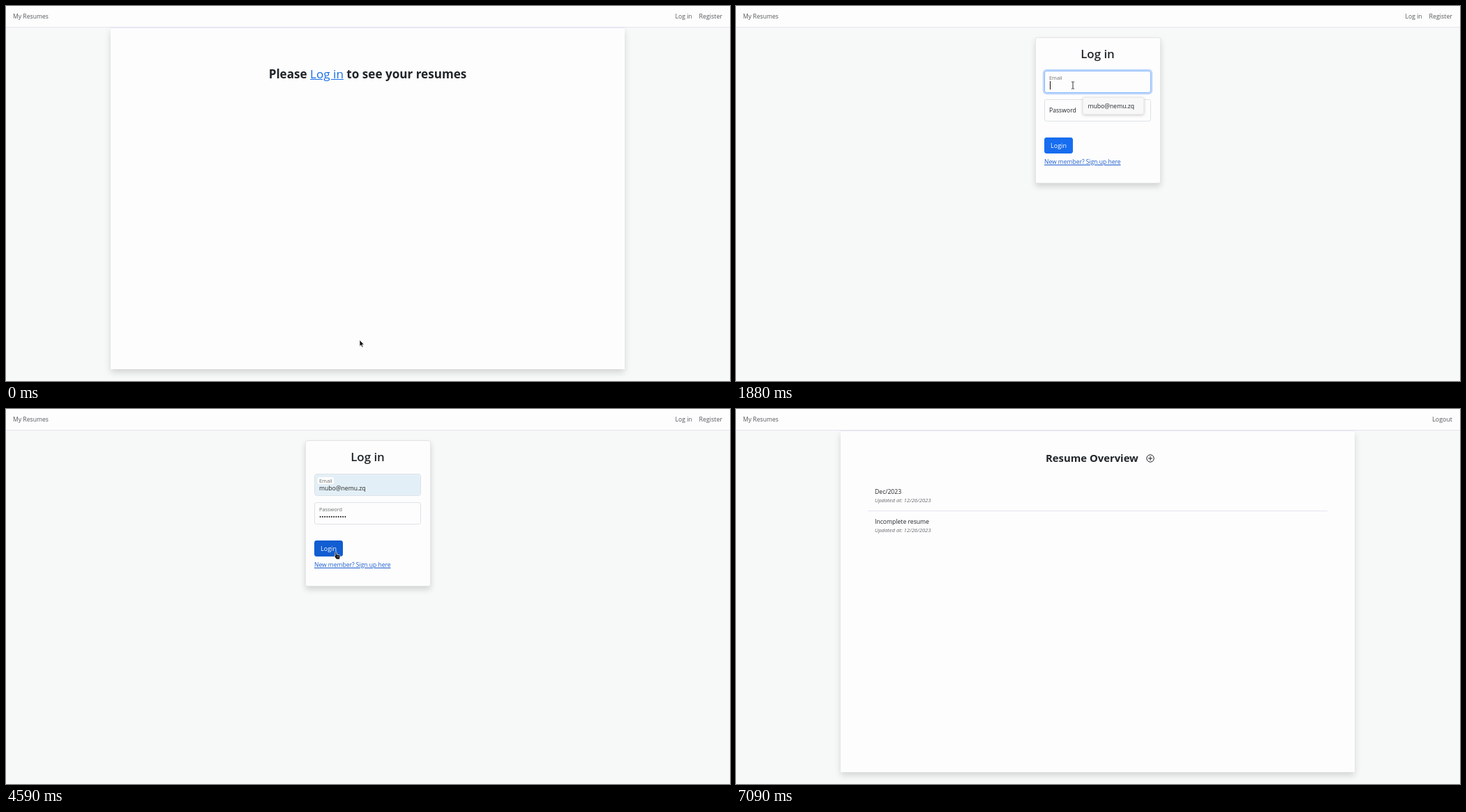
An HTML page that plays this animation: 1038x539 px, repeating every 7990 ms.

```html
<!DOCTYPE html>
<html lang="en">
<head>
<meta charset="utf-8">
<title>My Resumes</title>
<style>
html, body { margin: 0; width: 100%; height: 100%; overflow: hidden; }
body { position: relative; background: #f7f8f8; color: #212529; font: 8.65px/20px "Open Sans", "Noto Sans", sans-serif; }
body *, body *::before, body *::after { position: absolute; box-sizing: border-box; }
b, i, u, label, h1 { white-space: nowrap; margin: 0; font-weight: 400; font-style: normal; text-decoration: none; }
.scene { inset: 0; }
nav { left: 0; top: 0; width: 100%; height: 31px; background: #fdfdfd; border-bottom: 1px solid #e5e5f3; }
nav + b, .nav { color: #55585b; top: 5px; }
h1 { font-weight: 700; }
h1 u { position: static; color: #186ee8; text-decoration: underline; }
.mid { left: 518.5px; transform: translateX(-50%); }
.sheet { left: 150px; top: 31px; width: 737px; height: 491px; background: #fdfdfd; border-top: 1px solid #e9e9f4; box-shadow: 0 4.5px 9px rgba(0,0,0,.15); }
.card { left: 428.5px; top: 44.5px; width: 180px; height: 210px; background: #fdfdfd; border: 1px solid #e4e5e7; border-radius: 3px; box-shadow: 0 4.5px 9px rgba(0,0,0,.15); }
.field { left: 442px; width: 153px; height: 32px; border: 1px solid #dee2e6; border-radius: 3.4px; background: #fdfdfd; }
.ring { inset: -1px; border: 1px solid #86b7fe; border-radius: 3.4px; box-shadow: 0 0 0 2.25px rgba(13,110,253,.25); }
.fill { inset: 0; background: #e3eff6; border-radius: 2.5px; }
label { left: 6px; top: 5px; transform-origin: 0 50%; }
label::before { content: ""; z-index: -1; left: -3px; right: -3px; top: 4px; bottom: 4px; background: #fdfdfd; border-radius: 3px; }
.field label { z-index: 1; }
.value { left: 6px; top: 14px; line-height: 12px; }
.caret { left: 6.5px; top: 14px; width: 1px; height: 12px; background: #111; }
.menu { left: 496.5px; top: 130.5px; width: 88px; height: 25px; background: #f8f8f9; border: 1px solid #ebebed; border-radius: 3px; box-shadow: 0 1px 4px rgba(0,0,0,.2); }
.btn { left: 442px; top: 189px; width: 41px; height: 23px; border-radius: 3.4px; background: #176df0; color: #fff; font-size: 9px; line-height: 23px; text-align: center; }
.row { left: 189px; width: 659px; height: 44px; }
.row b { left: 10px; top: 6.5px; }
.row i { left: 10px; top: 18.5px; font-size: 7.64px; font-style: italic; color: #686b6e; }
.toast { left: 466.5px; top: 22px; width: 104px; height: 26.5px; border-radius: 4px; background: #2fba47; color: #fff; font: 9px/26.5px "Liberation Sans", Arial, sans-serif; text-align: center; box-shadow: 0 1px 4px rgba(0,0,0,.12); }
.status { left: -1px; bottom: -1px; width: 85px; height: 13px; background: #e9e9ea; border: 1px solid #d6d6d8; border-radius: 0 2px 0 0; font-size: 8.15px; line-height: 12px; padding-left: 2px; white-space: nowrap; }
svg { overflow: visible; left: 0; top: 0; }

.a { animation: 7990ms step-end infinite; }
.m { animation-timing-function: ease-in-out; }
#home { animation-name: home; }
#login { animation-name: login; }
#list { animation-name: list; }
#status { animation-name: status; }
#ring1 { animation-name: ring1; }
#ring2 { animation-name: ring2; }
#label1 { animation-name: label1; }
#label2 { animation-name: label2; }
#caret1 { animation-name: caret1; }
#caret2 { animation-name: caret2; }
#menu { animation-name: menu; }
#fill, #mail { animation-name: fill; }
#pick { animation-name: pick; }
#dots { animation-name: dots; }
#tail { animation-name: tail; }
#btn { animation-name: btn; }
#toast { animation-name: toast; }
#mouse { animation-name: mouse; }
#arrow { animation-name: arrow; }
#hand { animation-name: hand; }
#beam { animation-name: beam; }

@keyframes home { 0% { opacity: 1; } 12.52%, 100% { opacity: 0; } }
@keyframes login { 0%, 58.82%, 100% { opacity: 0; } 12.52% { opacity: 1; } }
@keyframes list { 0% { opacity: 0; } 58.82%, 100% { opacity: 1; } }
@keyframes status { 0%, 16.27%, 100% { opacity: 0; } 9.76% { opacity: 1; } }
@keyframes ring1 { 0%, 20.65%, 38.92%, 100% { opacity: 0; } 22.5%, 37.05% { opacity: 1; } }
@keyframes ring2 { 0%, 37.05%, 57.45%, 100% { opacity: 0; } 38.92%, 55.82% { opacity: 1; } }
@keyframes label1 {
  0%, 20.65% { transform: none; color: #212529; }
  21.9%, 100% { transform: translateY(-6px) scale(.85); color: #6a6d70; }
}
@keyframes label2 {
  0%, 37.05% { transform: none; color: #212529; }
  38.3%, 100% { transform: translateY(-6px) scale(.85); color: #6a6d70; }
}
@keyframes caret1 { 0%, 32.54%, 100% { opacity: 0; } 20.65% { opacity: 1; } }
@keyframes caret2 { 0%, 55.82%, 100% { opacity: 0; } 37.05% { opacity: 1; } }
@keyframes menu { 0%, 32.54%, 100% { opacity: 0; } 22.53% { opacity: 1; } }
@keyframes fill { 0% { opacity: 0; } 32.54%, 100% { opacity: 1; } }
@keyframes pick {
  0%, 37.05%, 100% { background: transparent; color: #212529; }
  35.17% { background: #cf402d; color: #fff; }
}
@keyframes dots {
  0%, 41.8% { clip-path: inset(0 100% 0 0); animation-timing-function: steps(12, start); }
  49.31%, 100% { clip-path: inset(0 0 0 0); }
}
@keyframes tail {
  0%, 41.8% { transform: none; animation-timing-function: steps(12, start); }
  49.31%, 100% { transform: translateX(100%); }
}
@keyframes btn { 0% { background: #176df0; } 53.57%, 100% { background: #115dd1; } }
@keyframes toast {
  0%, 58.82%, 77.5%, 100% { transform: translateY(-56px); }
  61.83%, 74.72% { transform: none; }
}
@keyframes mouse {
  0%, .75% { transform: translate(507px, 480px); }
  10.39%, 11.8% { transform: translate(456px, 98px); }
  13.7%, 15.89% { transform: translate(453px, 103px); }
  20.03%, 26.03% { transform: translate(483px, 114px); }
  30.04% { transform: translate(518px, 147px); }
  49.31% { transform: translate(518px, 147px); animation-timing-function: step-end; }
  51.81% { transform: translate(497px, 184px); animation-timing-function: step-end; }
  53.57%, 64.71% { transform: translate(473px, 205px); }
  69.34% { transform: translate(522px, 84px); animation-timing-function: linear; }
  74.72% { transform: translate(720px, 40px); animation-timing-function: linear; }
  79.72%, 100% { transform: translate(850px, -16px); }
}
@keyframes arrow {
  0%, 28.04%, 51.81%, 58.82% { opacity: 1; }
  9.76%, 32.54%, 53.57% { opacity: 0; }
  100% { opacity: 1; }
}
@keyframes hand { 0%, 12.52%, 58.82%, 100% { opacity: 0; } 9.76%, 53.57% { opacity: 1; } }
@keyframes beam { 0%, 28.04%, 51.81%, 100% { opacity: 0; } 12.52%, 32.54% { opacity: 1; } }
</style>
</head>
<body>
<nav></nav><b style="left:10px">My Resumes</b>

<div id="home" class="scene a">
  <b class="nav" style="left:959.5px">Log in</b><b class="nav" style="right:11px;font-size:8.9px">Register</b>
  <div class="sheet"></div>
  <h1 class="mid" style="top:87.5px;font-size:17.1px">Please <u>Log in</u> to see your resumes</h1>
</div>

<div id="login" class="scene a">
  <b class="nav" style="left:959.5px">Log in</b><b class="nav" style="right:11px;font-size:8.9px">Register</b>
  <div class="card"></div>
  <h1 class="mid" style="top:58.5px;font-size:16.9px;font-weight:600">Log in</h1>
  <div class="field" style="top:93px">
    <div id="fill" class="fill a"></div>
    <div id="ring1" class="ring a m"></div>
    <label id="label1" class="a m">Email</label>
    <div id="mail" class="value a"><b id="pick" class="a">mubo@nemu.zq</b></div>
    <div id="caret1" class="caret a"></div>
  </div>
  <div class="field" style="top:134px">
    <div id="ring2" class="ring a m"></div>
    <label id="label2" class="a m">Password</label>
    <div class="value">
      <span id="dots" class="a" style="position:relative;white-space:nowrap">••••••••••••</span>
      <div id="tail" class="a" style="inset:0"><div id="caret2" class="caret a" style="left:.5px;top:0"></div></div>
    </div>
  </div>
  <div id="menu" class="menu a"><b style="left:7px;top:2px">mubo@nemu.zq</b></div>
  <div id="btn" class="btn a">Login</div>
  <b style="left:442px;top:213.5px;font-size:8.53px;color:#1c5ccf;text-decoration:underline">New member? Sign up here</b>
</div>

<div id="list" class="scene a">
  <b class="nav" style="right:11px;font-size:8.9px">Logout</b>
  <div class="sheet"></div>
  <h1 style="left:444px;top:59.5px;font-size:14.85px">Resume Overview</h1>
  <svg width="1" height="1" fill="none" stroke="#25282b"><circle cx="594" cy="71" r="5.2"/><path d="M591 71h6M594 68v6"/></svg>
  <div class="row" style="top:102px;height:45px;border-bottom:1px solid #e5e5f1"><b>Dec/2023</b><i>Updated at: 12/26/2023</i></div>
  <div class="row" style="top:145.5px"><b>Incomplete resume</b><i>Updated at: 12/26/2023</i></div>
  <div id="toast" class="toast a m">Login successful!</div>
</div>

<div id="status" class="status a">quillhost:4310/enter</div>

<div id="mouse" class="a m" style="left:0;top:0">
  <svg id="arrow" class="a" width="1" height="1"><path d="M0 0V9.2L2 7.4 3.5 10.6 5 9.9 3.6 6.8H6.4Z" fill="#111" stroke="#fff" stroke-width=".7"/></svg>
  <svg id="hand" class="a" width="1" height="1"><path d="M-1 .5Q0-1 1 .5V4L5 4.8Q6.4 5.2 6 7L5.3 11H.8L-2.2 7Q-2.4 5.4-1 6Z" fill="#111" stroke="#fff" stroke-width=".7"/><path d="M2 6.3v2M3.7 6.5v2" stroke="#fff" stroke-width=".5"/></svg>
  <svg id="beam" class="a" width="1" height="1"><path d="M-2-5H-.6L0-4.4.6-5H2M0-4.4V4.4M-2 5H-.6L0 4.4.6 5H2" fill="none" stroke="#333"/></svg>
</div>
</body>
</html>
```
